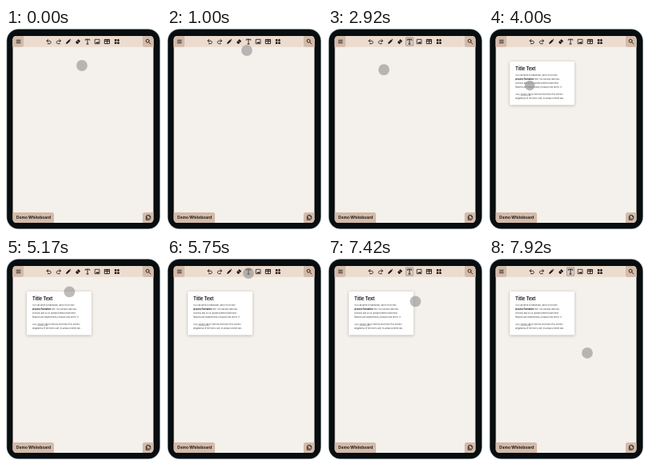
An HTML page with a canvas for the animation above (8 s loop, 194 by 253 pixels).

```html
<!DOCTYPE html>
<html lang="en">
<head>
<meta charset="utf-8">
<title>Whiteboard demo</title>
<style>
html, body { margin: 0; width: 100%; height: 100%; overflow: hidden; background: #fff; }
canvas { display: block; width: 194px; height: 253px; }
</style>
</head>
<body>
<canvas id="stage"></canvas>
<script>
const W = 194, H = 253, LOOP = 8000, FPS = 12;
const INK = '#1b1918', BUTTON = '#d4bbaa', BAR = '#ecdccf', PAPER = '#f4f0eb';
const canvas = document.getElementById('stage');
const ctx = canvas.getContext('2d');
const ratio = Math.max(1, window.devicePixelRatio || 1);
canvas.width = W * ratio;
canvas.height = H * ratio;

// Pointer stops: time, x, y
const path = [
  [0, 95, 47], [420, 95, 47], [1330, 102, 20], [2330, 101, 20],
  [3340, 51, 72], [4650, 51, 72], [5610, 102, 19],
  [7080, 102, 19], [7920, 123, 119], [8000, 123, 119]
];
const taps = [2170, 4000, 6670];
const CARD_AT = 3920;
const toolActive = t => (t >= 2160 && t < CARD_AT) || t >= 6660;

const ease = p => p * p * (3 - 2 * p);

function pointerAt(t) {
  const i = Math.max(1, path.findIndex(k => k[0] >= t));
  const [t0, x0, y0] = path[i - 1], [t1, x1, y1] = path[i];
  const p = ease((t - t0) / (t1 - t0));
  return [x0 + (x1 - x0) * p, y0 + (y1 - y0) * p];
}

function box(x, y, w, h, r, fill) {
  ctx.beginPath();
  ctx.roundRect(x, y, w, h, r);
  ctx.fillStyle = fill;
  ctx.fill();
}

function text(str, x, y, size, weight = 400, color = INK) {
  // Large font scaled down keeps glyph spacing precise.
  ctx.save();
  ctx.translate(x, y);
  ctx.scale(0.1, 0.1);
  ctx.font = `${weight} ${size * 10}px Inter, Roboto, sans-serif`;
  ctx.fillStyle = color;
  ctx.fillText(str, 0, 0);
  const width = ctx.measureText(str).width / 10;
  ctx.restore();
  return width;
}

function stroke(d, x, y, width = 0.9, flip = 1) {
  ctx.save();
  ctx.translate(x, y);
  ctx.scale(flip, 1);
  ctx.lineWidth = width;
  ctx.strokeStyle = INK;
  ctx.lineCap = ctx.lineJoin = 'round';
  ctx.stroke(new Path2D(d));
  ctx.restore();
}

function fill(d, x, y) {
  ctx.save();
  ctx.translate(x, y);
  ctx.fillStyle = INK;
  ctx.fill(new Path2D(d));
  ctx.restore();
}

function device() {
  ctx.fillStyle = '#fff';
  ctx.fillRect(0, 0, W, H);
  box(0.8, 1.2, 192, 250.6, 15, '#46555a');
  box(1.5, 1.9, 190.6, 249.2, 14.4, '#080d0f');
  box(8.5, 10, 176, 234, 4.5, PAPER);
}

function icons(active) {
  const y = 17;
  const arrow = 'M-.8 -2.6L-2.6 -.9L-.8 .8M-2.4 -.9H.7C3.4 -.9 3.4 2.7 .7 2.7H-1.2';
  stroke(arrow, 53.5, y);
  stroke(arrow, 66, y, 0.9, -1);

  fill('M-3 3L-2.5 .9L1 -2.6L2.6 -1L-.9 2.5ZM1.5 -3L2.1 -3.4L3.4 -2.1L3 -1.5Z', 78, y);
  fill('M-3 .8L.6 -3L3.1 -.6L-.3 3H-1.2Z', 90, y);
  ctx.save();
  ctx.strokeStyle = BAR;
  ctx.lineWidth = 0.6;
  ctx.beginPath();
  ctx.moveTo(88.9, 16);
  ctx.lineTo(91.2, 18.2);
  ctx.stroke();
  ctx.restore();

  if (active) {
    box(97.1, 11.6, 10, 10.8, 0.8, '#8f8781');
    box(97.7, 12.2, 8.8, 9.6, 0.4, '#d9cbc0');
  }
  stroke('M-2.7 -1.7V-2.8H2.7V-1.7M0 -2.8V3M-1.1 3H1.1', 102, y);

  stroke('M-2.7 -2.7H2.7V2.7H-2.7Z', 114.3, y, 0.8);
  fill('M-2 2L-.8 .2L0 1.1L1 -.3L2.1 2Z', 114.3, y);
  stroke('M-2.9 -2.6H2.9V2.6H-2.9ZM-2.9 -.4H2.9M0 -2V2.6', 126.6, y, 0.9);
  stroke('M-2.9 -2.2H2.9', 126.6, y, 1.1);
  fill('M-2.9 -2.9H-.4V-.4H-2.9ZM-2.9 .5H-.4V3H-2.9ZM.5 .5H3V3H.5ZM1.7 -3.4L3.4 -1.7L1.7 0L0 -1.7Z', 138.8, y);
}

function chrome(active) {
  ctx.save();
  ctx.beginPath();
  ctx.roundRect(8.5, 10, 176, 234, 4.5);
  ctx.clip();
  box(8, 10, 177, 13.8, 0, BAR);
  box(8, 10, 14, 13.8, [0, 0, 2, 0], BUTTON);
  box(171, 10, 14, 13.8, [0, 0, 0, 2], BUTTON);
  box(8, 231, 52, 13.5, [0, 2.5, 0, 0], BUTTON);
  box(171, 231, 14, 13.5, [2.5, 0, 0, 0], BUTTON);
  ctx.restore();

  stroke('M-2.4 -1.8H2.4M-2.4 0H2.4M-2.4 1.8H2.4', 15.6, 17, 0.8);
  stroke('M1.2 -.8A2 2 0 1 1 -2.8 -.8A2 2 0 1 1 1.2 -.8M.7 .7L2.9 2.9', 178, 17, 0.9);
  stroke('M-1.3 -2.9H1.2L2.8 -1.3V1.7H-1.3ZM1 -2.7V-1.1H2.6M-2.7 -1.4V3H1.4', 178, 237.3, 0.8);
  text('Demo Whiteboard', 13, 239.3, 4.9, 700);
  icons(active);
}

function card() {
  ctx.save();
  ctx.shadowColor = 'rgba(70, 55, 45, .35)';
  ctx.shadowBlur = 3.5 * ratio;
  ctx.shadowOffsetY = 0.8 * ratio;
  box(26, 42, 81, 54.5, 0.8, '#fff');
  ctx.restore();
  text('Title Text', 33, 52.6, 5.6, 700);

  const size = 2.5, grey = '#3d3b3a', x = 33;
  const line = (str, y) => text(str, x, y, size, 400, grey);
  line("You can write in markdown, and it'll turn into", 60.4);
  const bold = text('properly formatted', x, 65.3, size, 700);
  text(' text! You can also add sub-', x + bold, 65.3, size, 400, grey);
  line('sections and so on (please pretend that these', 70.2);
  line("features are implemented, because they aren't :P", 75.1);

  const also = line('Also, ', 84);
  const link = text('double-tap', x + also, 84, size, 400, grey);
  ctx.fillStyle = grey;
  ctx.fillRect(x + also, 84.5, link, 0.3);
  text(' to edit this text text in full screen!', x + also + link, 84, size, 400, grey);
  line("Regardless of the text's size, its actual content can...", 88.9);
}

function pointer(t) {
  const [x, y] = pointerAt(t);
  const press = Math.max(...taps.map(k => Math.max(0, 1 - Math.abs(t - k) / 250)));
  ctx.beginPath();
  ctx.arc(x, y, 6.9 - 0.7 * press, 0, Math.PI * 2);
  ctx.fillStyle = `rgba(136, 136, 136, ${0.56 + 0.04 * press})`;
  ctx.fill();
}

function draw(now) {
  const t = Math.floor((now % LOOP) * FPS / 1000 + 0.05) * 1000 / FPS % LOOP;
  ctx.setTransform(ratio, 0, 0, ratio, 0, 0);
  device();
  chrome(toolActive(t));
  if (t >= CARD_AT - 10) card();
  pointer(t);
}

const start = performance.now();
function tick() {
  draw(performance.now() - start);
  requestAnimationFrame(tick);
}
tick();
</script>
</body>
</html>
```
